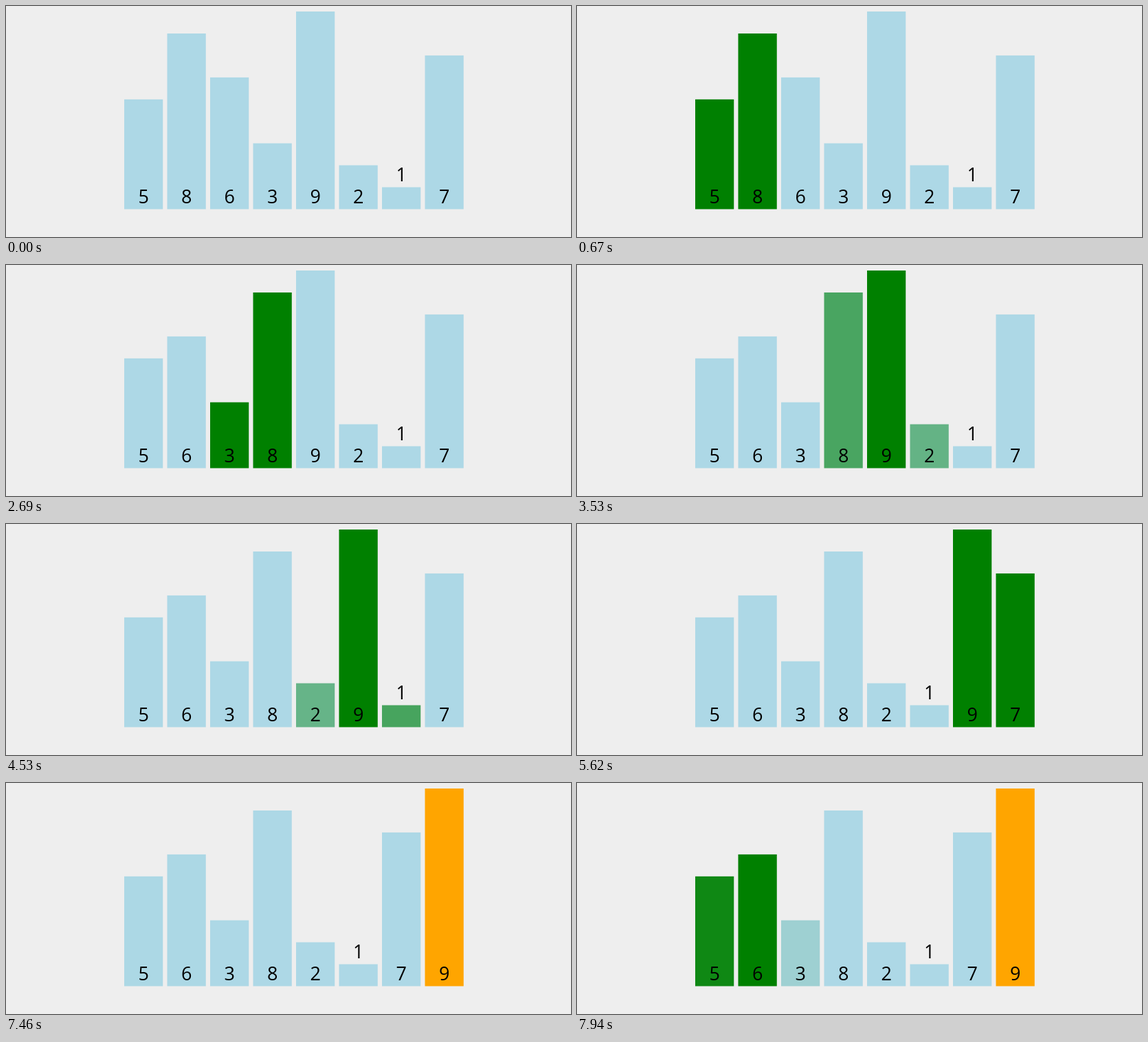
Write an HTML page that moves like this. It is 822 by 336 pixels and loops after 8000 ms.

```html
<!DOCTYPE html>
<html lang="en">
<head>
<meta charset="utf-8">
<title>Bubble sort</title>
<style>
  html, body { margin: 0; width: 100%; height: 100%; overflow: hidden; background: #eee; }
  svg { display: block; }
  text { font: 27px "Open Sans", "Noto Sans", sans-serif; text-anchor: middle; }
</style>
</head>
<body>
<svg id="stage" width="822" height="336" viewBox="0 0 822 336"></svg>
<script>
const LOOP = 8000;
const FIRST_ACTION = 430, ACTION_MS = 495.6, EASE_MS = 250;
const STEP_MS = 77.4, STEP_OFFSET = 38.6;
const LEFT = 172, PITCH = 62.5, BAR_WIDTH = 56.25, BASE = 295.5, UNIT = 31.94;
const IDLE = [173, 216, 230], ACTIVE = [0, 128, 0], SORTED = [255, 165, 0];
const values = [5, 8, 6, 3, 9, 2, 1, 7];

// Runs the sort and records every bar's slot and colour after each action.
function recordSort() {
  const order = values.map((_, i) => i);
  let colors = values.map(() => IDLE);
  const states = [];
  const record = () => states.push(values.map((_, i) => ({ slot: order.indexOf(i), color: colors[i] })));
  for (let end = values.length - 1; end > 0; end--) {
    record(); // each pass opens with a pause
    for (let j = 0; j < end; j++) {
      const a = order[j], b = order[j + 1];
      colors = colors.map((c, i) => c === SORTED ? c : i === a || i === b ? ACTIVE : IDLE);
      record();
      if (values[a] > values[b]) {
        order[j] = b;
        order[j + 1] = a;
        record();
      }
    }
    colors = colors.map((c, i) => i === order[end] || c === SORTED ? SORTED : IDLE);
    record();
  }
  return states;
}

const states = recordSort();
const stage = document.getElementById("stage");

function add(tag, attributes) {
  const node = document.createElementNS("http://www.w3.org/2000/svg", tag);
  for (const name in attributes) node.setAttribute(name, attributes[name]);
  return stage.appendChild(node);
}

const bars = values.map(v => add("rect", { y: BASE - v * UNIT, width: BAR_WIDTH, height: v * UNIT }));
const labels = values.map(v => {
  // A bar too short for its label carries it on top.
  const label = add("text", { y: BASE - 9 - (v < 2 ? v * UNIT : 0) });
  label.textContent = v;
  return label;
});

const mix = (a, b, p) => a + (b - a) * p;
const cubicInOut = t => t < 0.5 ? 4 * t ** 3 : 1 - 4 * (1 - t) ** 3;

function render(time) {
  // The picture refreshes at a fixed low rate.
  const held = STEP_OFFSET + Math.floor((time - STEP_OFFSET) / STEP_MS) * STEP_MS;
  const action = Math.max(0, Math.floor((held - FIRST_ACTION) / ACTION_MS));
  const elapsed = held - FIRST_ACTION - action * ACTION_MS;
  const p = cubicInOut(Math.min(1, Math.max(0, elapsed / EASE_MS)));
  values.forEach((_, i) => {
    const from = states[action][i], to = states[action + 1][i];
    const x = LEFT + PITCH * mix(from.slot, to.slot, p);
    const rgb = from.color.map((c, k) => Math.round(mix(c, to.color[k], p)));
    bars[i].setAttribute("x", x);
    bars[i].setAttribute("fill", `rgb(${rgb})`);
    labels[i].setAttribute("x", x + BAR_WIDTH / 2);
  });
}

const started = performance.now();
function tick() {
  render((performance.now() - started) % LOOP);
  requestAnimationFrame(tick);
}
tick();
</script>
</body>
</html>
```
